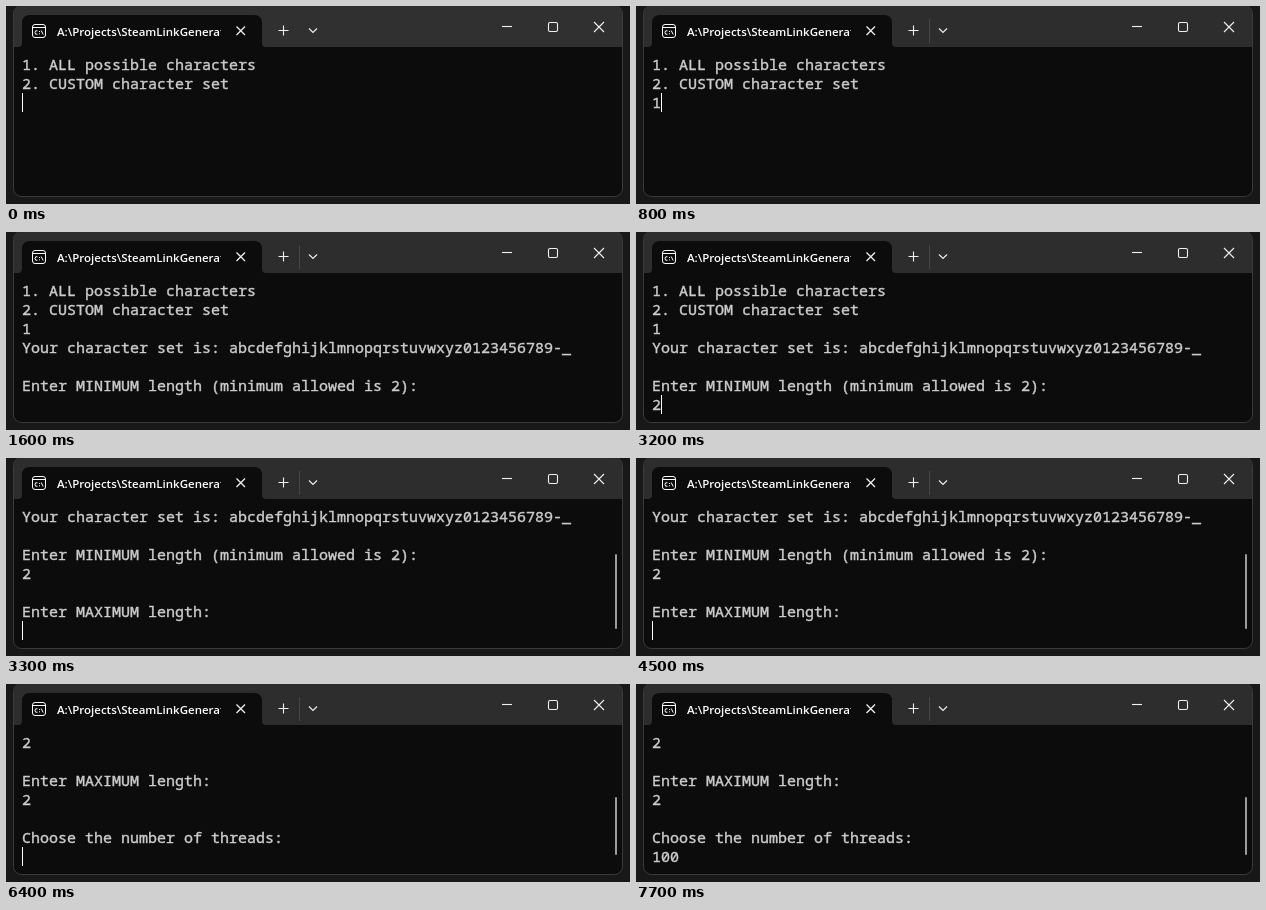
Recreate the animation shown at these times as an HTML page. Size 624 by 198 pixels, loop 8 s.

```html
<!DOCTYPE html>
<html lang="en">
<head>
<meta charset="utf-8">
<title>Terminal</title>
<style>
html, body { margin: 0; width: 100%; height: 100%; overflow: hidden; background: #181818; }
#stage { position: relative; width: 624px; height: 198px; overflow: hidden; background: #181818; }
svg { position: absolute; inset: 0; }
#title {
  position: absolute; left: 51px; top: 16px; width: 164px; height: 19px; overflow: hidden;
  font: 600 11.5px/19px "Open Sans", "Noto Sans", sans-serif; color: #fff; white-space: pre;
}
#screen {
  position: absolute; left: 16px; top: 49px; margin: 0; color: #ccc;
  font: 400 15px/19px "Noto Sans Mono", "DejaVu Sans Mono", monospace;
  -webkit-text-stroke: .4px #ccc; font-variant-ligatures: none; white-space: pre;
}
#cursor { position: absolute; width: 1px; height: 19px; background: #fff; }
#bar { position: absolute; left: 609px; width: 2px; border-radius: 1px; background: #9c9c9c; }
</style>
</head>
<body>
<div id="stage">
  <svg width="624" height="198" viewBox="0 0 624 198" fill="none">
    <rect x="7.5" y="-.5" width="609" height="191" rx="8" fill="#0c0c0c"/>
    <path id="head" d="M8 41V8Q8 0 16 0H608Q616 0 616 8V41Z"/>
    <path d="M12 41Q16 41 16 37V17Q16 9 24 9H248Q256 9 256 17V37Q256 41 260 41Z" fill="#0c0c0c"/>
    <rect x="7.5" y="-.5" width="609" height="191" rx="8" stroke="#3b3b3b"/>
    <g stroke="#fff">
      <rect x="26.5" y="18.5" width="13" height="13" rx="2.5"/>
      <path d="M27 21.5H39"/>
      <path d="M31.5 24.8Q29 24 29 26.5T31.5 28.2M33.5 25v1M33.5 27.3v1M35.2 24.5L37.2 28.5"/>
    </g>
    <path id="split" d="M293.5 13V37" stroke="#454545"/>
    <g stroke="#f0f0f0" stroke-width="1.1">
      <path d="M230.5 20.5L239 29M239 20.5L230.5 29" stroke-width="1.3"/>
      <path d="M272.5 24.5H282.5M277.5 19.5V29.5"/>
      <path d="M303 22.5L307 26.5L311 22.5"/>
      <path d="M496 20.5H506"/>
      <rect x="542.5" y="16.5" width="9" height="9" rx="1.5"/>
      <path d="M588 16L598 26M598 16L588 26"/>
    </g>
  </svg>
  <div id="title">A:\Projects\SteamLinkGenerator</div>
  <pre id="screen"></pre>
  <div id="cursor"></div>
  <div id="bar"></div>
</div>
<script>
const LOOP = 8000, TICK = 100, BLINK = 553, KEY_GAP = 200;
const ROWS = 7, CELL = 9, LINE = 19, LEFT = 16, TOP = 49;
const BAR_END = 171, TRACK = 107;
const $ = id => document.getElementById(id);

// Each prompt prints its rows at `at`; typing of the answer begins at `type`.
const prompts = [
  { at: 0, type: 800, answer: "1", rows: ["1. ALL possible characters", "2. CUSTOM character set"] },
  { at: 900, type: 3000, answer: "2", rows: [
    "Your character set is: abcdefghijklmnopqrstuvwxyz0123456789-_", "",
    "Enter MINIMUM length (minimum allowed is 2):"] },
  { at: 3300, type: 5200, answer: "2", rows: ["", "Enter MAXIMUM length:"] },
  { at: 6000, type: 6700, answer: "100", rows: ["", "Choose the number of threads:"] }
];

const typedBy = (p, t) =>
  p.answer.slice(0, Math.max(0, Math.floor((t - p.type) / KEY_GAP) + 1));

// Printing, every key and Enter (one tick before the next output) restart the blink.
const resets = prompts.flatMap((p, i) => [
  p.at,
  ...[...p.answer].map((_, k) => p.type + k * KEY_GAP),
  i + 1 < prompts.length ? prompts[i + 1].at - TICK : p.at
]);

function cursorOn(t) {
  const last = Math.max(...resets.filter(r => r <= t));
  return Math.floor((t - last) / BLINK) % 2 === 0;
}

function drawHeader(t) {
  const focus = Math.min(1, Math.max(0, (t - TICK) / (5 * TICK)));
  const grey = Math.round(48 - 3 * focus);
  $("head").setAttribute("fill", `rgb(${grey},${grey},${grey})`);
  $("split").setAttribute("opacity", focus);
}

function drawScreen(t) {
  const log = prompts.filter(p => p.at <= t).flatMap(p => [...p.rows, typedBy(p, t)]);
  const view = log.slice(-ROWS);
  $("screen").textContent = view.join("\n");

  const cursor = $("cursor").style;
  cursor.left = LEFT + log.at(-1).length * CELL + "px";
  cursor.top = TOP + (view.length - 1) * LINE + "px";
  cursor.visibility = cursorOn(t) ? "visible" : "hidden";

  const bar = $("bar").style, height = Math.round(TRACK * ROWS / log.length);
  bar.visibility = log.length > ROWS ? "visible" : "hidden";
  bar.top = BAR_END - height + "px";
  bar.height = height + "px";
}

const start = performance.now();
let shown = -1;
function frame(now) {
  const t = Math.floor(Math.max(0, now - start) % LOOP / TICK) * TICK;
  if (t !== shown) {
    shown = t;
    drawHeader(t);
    drawScreen(t);
  }
  requestAnimationFrame(frame);
}
frame(start);
</script>
</body>
</html>
```
